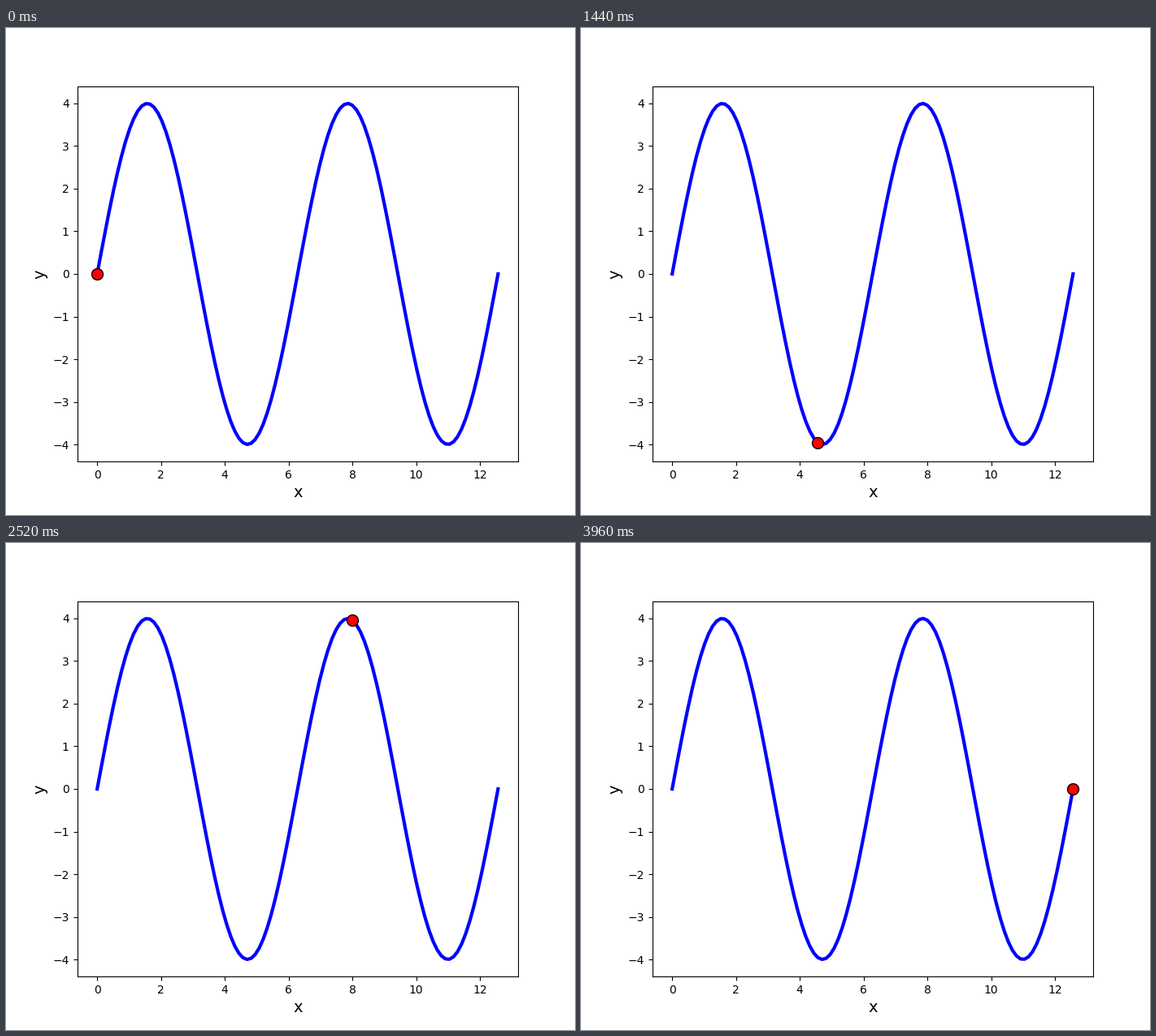
Recreate the animation shown at these times as a matplotlib script. Size 700x600 px, loop 4 s.

```python
import numpy as np
import matplotlib.pyplot as plt
from matplotlib.animation import FuncAnimation

FRAMES = 100
INTERVAL = 40  # ms

x = np.linspace(0, 4 * np.pi, FRAMES)
y = 4 * np.sin(x)

fig, ax = plt.subplots(figsize=(7, 6), dpi=100)
ax.plot(x, y, color="blue", linewidth=3)
dot, = ax.plot(x[:1], y[:1], "o", markersize=10,
               markerfacecolor="red", markeredgecolor="black")
ax.set_xlabel("x", fontsize=14)
ax.set_ylabel("y", fontsize=14)


def update(i):
    dot.set_data([x[i]], [y[i]])
    return dot,


anim = FuncAnimation(fig, update, frames=FRAMES, interval=INTERVAL,
                     repeat=True, repeat_delay=0)
plt.show()
```
